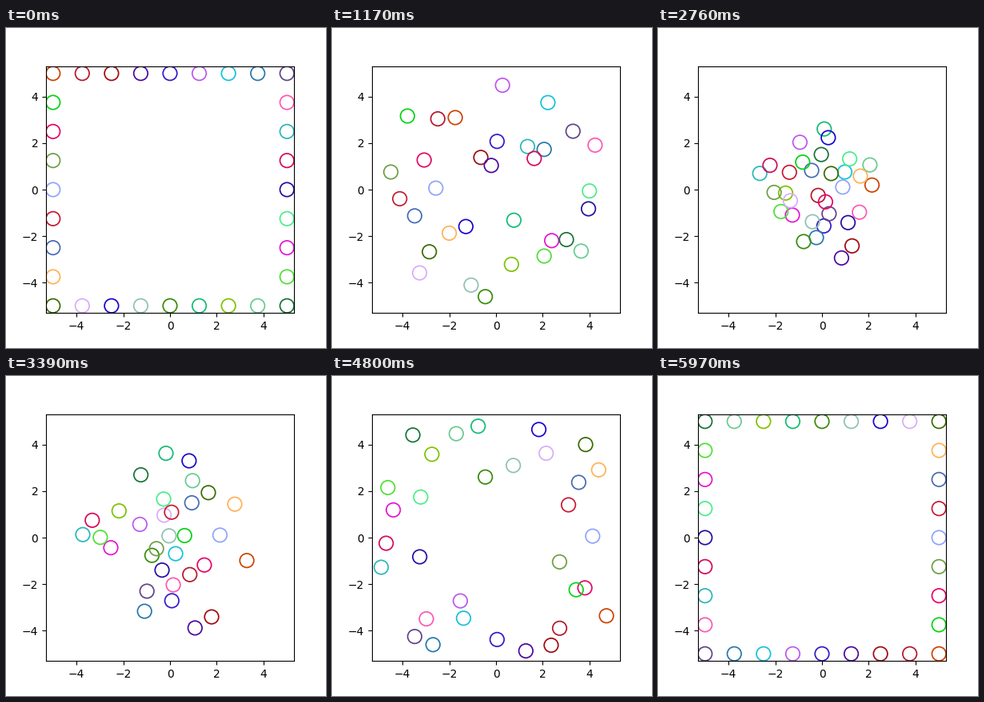
Animation, 400 px wide and 400 px high, one loop 6 s. Source, as a matplotlib script:

```python
import numpy as np
import matplotlib.pyplot as plt
from matplotlib.animation import FuncAnimation
from matplotlib.patches import Circle

FRAMES = 200
LIMIT = 5.3
RADIUS = 0.3
SIDE = np.linspace(-5, 5, 9)

# ring colour and the point it passes halfway, clockwise from the top left
TOP = [
    ("#cc4204", 2.58, -0.23), ("#b5182c", 0.20, -0.74), ("#a00a10", 1.48, -2.81),
    ("#4b08a0", 0.93, -3.32), ("#341acc", 0.08, -2.00), ("#bd58ec", -1.08, 1.53),
    ("#14c2da", 0.72, 0.24), ("#2878ac", -0.55, -2.49), ("#62448a", -0.16, -1.51),
]
RIGHT = [
    ("#ff58b2", 1.09, -1.37), ("#2cb6ba", -3.08, 0.50), ("#d8085a", -2.65, 0.95),
    ("#240ea4", 0.60, -1.43), ("#4aee88", 0.67, 1.46), ("#e614d2", -1.74, -0.87),
    ("#4ee036", -2.22, -0.61),
]
BOTTOM = [
    ("#167436", -0.47, 1.96), ("#6aca92", 1.68, 1.58), ("#7ec200", -1.80, 0.32),
    ("#12bc72", 0.00, 3.01), ("#388c08", -0.79, -1.73), ("#8ec2b2", -0.28, -0.87),
    ("#1804d0", 0.47, 2.65), ("#daacf8", -0.97, 0.04), ("#3a6c00", 0.85, 1.15),
]
LEFT = [
    ("#ffb256", 2.07, 0.90), ("#466cb4", 0.05, 1.08), ("#c81a34", -0.88, 0.88),
    ("#90a4fc", 1.35, 0.11), ("#6ca046", -1.54, -0.25), ("#e80466", 0.63, -0.77),
    ("#04d414", -0.31, 0.80),
]


def border():
    """Starting cells around the square, clockwise from the top left."""
    inner = SIDE[1:-1]
    return ([(x, 5) for x in SIDE] + [(5, y) for y in inner[::-1]]
            + [(x, -5) for x in SIDE[::-1]] + [(-5, y) for y in inner])


def track(home, mid):
    """Cross to the opposite cell, bulging through mid at half time."""
    s = np.linspace(0, 1, FRAMES)[:, None]
    lead = home @ mid / np.linalg.norm(home)
    ease = min(0.12, 0.12 + 0.04 * lead)
    along = 1 - 2 * s + ease * np.sin(2 * np.pi * s)
    return home * along + mid * np.sin(np.pi * s)


fig, ax = plt.subplots(figsize=(4, 4), dpi=100)
ax.set_xlim(-LIMIT, LIMIT)
ax.set_ylim(-LIMIT, LIMIT)

rings, tracks = [], []
for home, (color, *mid) in zip(border(), TOP + RIGHT + BOTTOM + LEFT):
    rings.append(ax.add_patch(Circle(home, RADIUS, fill=False, ec=color, lw=1.25)))
    tracks.append(track(np.array(home), np.array(mid)))


def update(i):
    for ring, path in zip(rings, tracks):
        ring.center = path[i]
    return rings


anim = FuncAnimation(fig, update, frames=FRAMES, interval=30, repeat=True, repeat_delay=0)
plt.show()
```
